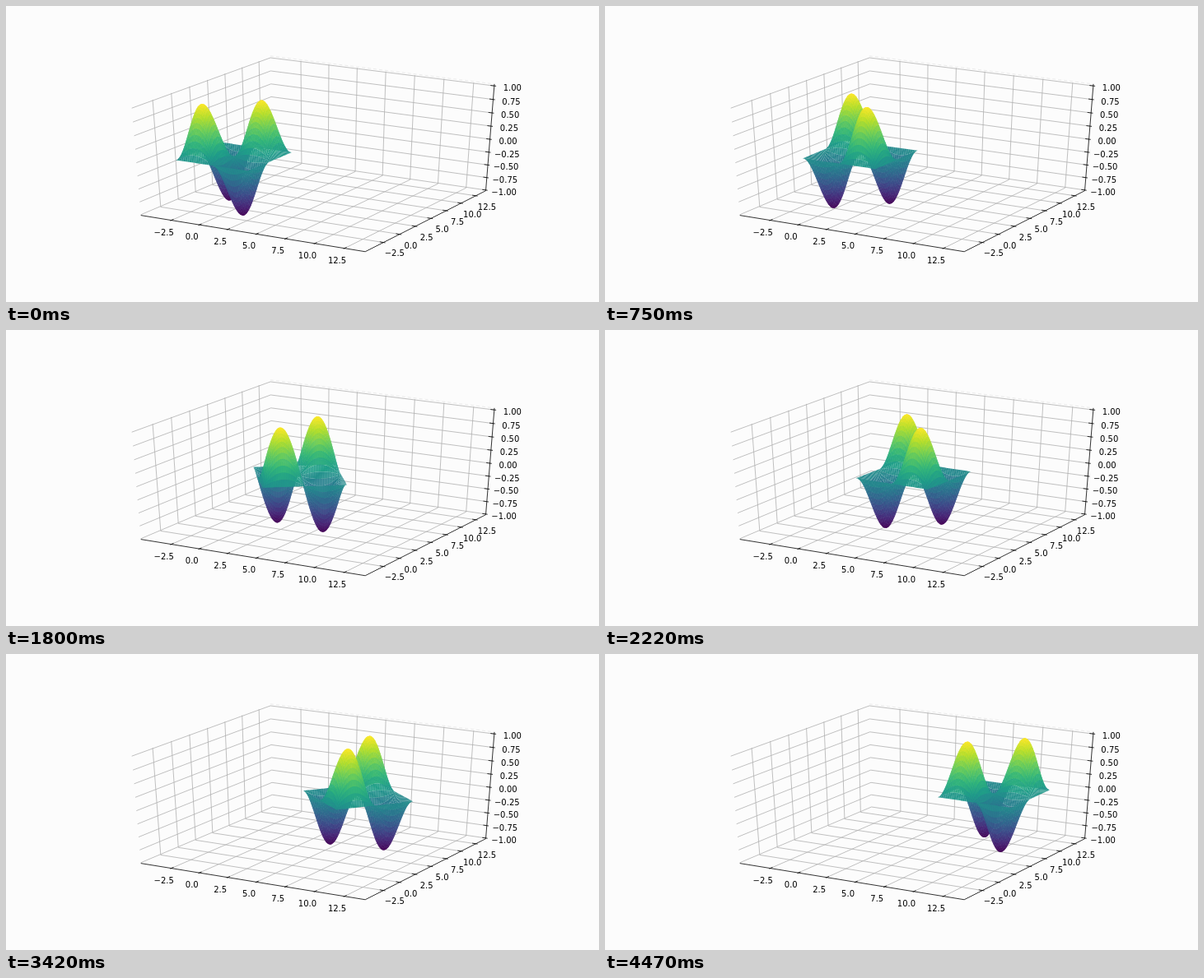
Animation of 720x360 px, one loop 4500 ms. Source, as an HTML page with a canvas:

```html
<!DOCTYPE html>
<html lang="en">
<head>
<meta charset="utf-8">
<title>Rotating surface</title>
<style>
  html, body { margin: 0; width: 100%; height: 100%; overflow: hidden; background: #fcfcfc; }
  canvas { display: block; }
</style>
</head>
<body>
<canvas id="stage" width="720" height="360"></canvas>
<script>
const canvas = document.getElementById('stage');
const ctx = canvas.getContext('2d');

const LOOP = 4500, STEP = 30, LAST = LOOP / STEP - 1;
const TURN = 3 * Math.PI, TRAVEL = 8.88;
const CELLS = 49;
const MID = 4.486, RANGE = 18.7, Z_SCALE = 0.4935;
const EDGE = 0.5208, FLOOR = -0.5, TOP = 0.5, RIM = 0.51;
const VIRIDIS = [
  [68, 1, 84], [72, 40, 120], [62, 74, 137], [49, 104, 142], [38, 130, 142],
  [31, 158, 137], [53, 183, 121], [109, 205, 89], [180, 222, 44], [253, 231, 37]
];

// Perspective camera: elevation 30°, azimuth -60°, distance 10.
const S = Math.sqrt(3) / 2;
function project(u, v, w) {
  const depth = S * (0.5 * u - S * v) + 0.5 * w;
  const right = S * u + 0.5 * v;
  const up = -0.25 * u + 0.5 * S * v + S * w;
  return {
    x: 376.5 + 3016 * right / (10 - depth),
    y: 176.1 - 1498.4 * up / (10 - depth),
    depth
  };
}

const unit = value => (value - MID) / RANGE;

function line(color, width, ...points) {
  ctx.strokeStyle = color;
  ctx.lineWidth = width;
  ctx.beginPath();
  for (const p of points) {
    const { x, y } = project(...p);
    ctx.lineTo(x, y);
  }
  ctx.stroke();
}

function label(value, digits, at, dx, dy) {
  const { x, y } = project(...at);
  const text = value.toFixed(digits).replace('-', '\u2212');
  ctx.fillText(text, x + dx, y + dy + 3.6);
}

function drawAxes() {
  const grid = (...points) => line('#b0b0b0', 0.8, ...points);
  const axis = (...points) => line('#000', 0.8, ...points);
  const inner = EDGE - 0.0167, outer = EDGE + 0.0083;
  const flat = [], steep = [];
  for (let i = 0; i < 7; i++) flat.push(-2.5 + 2.5 * i);
  for (let i = 0; i < 9; i++) steep.push(-1 + 0.25 * i);

  ctx.setLineDash([4, 3]);
  line('#e6e6e6', 0.8, [-EDGE, EDGE, RIM], [EDGE, EDGE, RIM]);
  ctx.setLineDash([]);

  for (const value of flat) {
    const k = unit(value);
    grid([k, -EDGE, FLOOR], [k, EDGE, FLOOR], [k, EDGE, TOP]);
    grid([EDGE, k, FLOOR], [-EDGE, k, FLOOR], [-EDGE, k, TOP]);
  }
  for (const value of steep) {
    const w = value * Z_SCALE;
    grid([-EDGE, -EDGE, w], [-EDGE, EDGE, w], [EDGE, EDGE, w]);
  }

  axis([-EDGE, -EDGE, FLOOR], [EDGE, -EDGE, FLOOR], [EDGE, EDGE, FLOOR], [EDGE, EDGE, RIM]);

  ctx.font = '10px "DejaVu Sans", sans-serif';
  ctx.textAlign = 'center';
  ctx.fillStyle = '#000';
  for (const value of flat) {
    const k = unit(value);
    axis([k, -outer, FLOOR], [k, -inner, FLOOR]);
    axis([outer, k, FLOOR], [inner, k, FLOOR]);
    label(value, 1, [k, -EDGE, FLOOR], -9, 14.4);
    label(value, 1, [EDGE, k, FLOOR], 13.5, 13.3);
  }
  for (const value of steep) {
    const w = value * Z_SCALE;
    axis([inner, EDGE, w], [outer, EDGE, w]);
    label(value, 2, [EDGE, EDGE, w], 22, 2.5);
  }
}

function heightColor(z) {
  const pos = Math.min(1, Math.max(0, (z + 1) / 2)) * (VIRIDIS.length - 1);
  const i = Math.min(VIRIDIS.length - 2, Math.floor(pos));
  const mix = VIRIDIS[i].map((c, k) => Math.round(c + (VIRIDIS[i + 1][k] - c) * (pos - i)));
  return `rgb(${mix})`;
}

function drawSurface(progress) {
  const center = TRAVEL * progress;
  const cos = Math.cos(TURN * progress), sin = Math.sin(TURN * progress);
  const nodes = [];
  for (let i = 0; i <= CELLS; i++) {
    const p = Math.PI * (2 * i / CELLS - 1);
    const row = [];
    for (let j = 0; j <= CELLS; j++) {
      const q = Math.PI * (2 * j / CELLS - 1);
      const z = Math.sin(p) * Math.sin(q);
      const node = project(
        unit(center + p * cos - q * sin),
        unit(center + p * sin + q * cos),
        z * Z_SCALE
      );
      node.z = z;
      row.push(node);
    }
    nodes.push(row);
  }

  const quads = [];
  for (let i = 0; i < CELLS; i++) {
    for (let j = 0; j < CELLS; j++) {
      const corners = [nodes[i][j], nodes[i + 1][j], nodes[i + 1][j + 1], nodes[i][j + 1]];
      const mean = key => corners.reduce((sum, c) => sum + c[key], 0) / 4;
      quads.push({ corners, depth: mean('depth'), z: mean('z') });
    }
  }
  quads.sort((a, b) => a.depth - b.depth);

  for (const { corners, z } of quads) {
    ctx.fillStyle = heightColor(z);
    ctx.beginPath();
    for (const c of corners) ctx.lineTo(c.x, c.y);
    ctx.fill();
  }
}

let shown = -1;
function render(now) {
  const step = Math.floor((now % LOOP) / STEP);
  if (step !== shown) {
    shown = step;
    ctx.fillStyle = '#fcfcfc';
    ctx.fillRect(0, 0, canvas.width, canvas.height);
    drawAxes();
    drawSurface(step / LAST);
  }
  requestAnimationFrame(tick);
}

let start = null;
function tick() {
  const now = performance.now();
  if (start === null) start = now;
  render(now - start);
}
tick();
</script>
</body>
</html>
```
